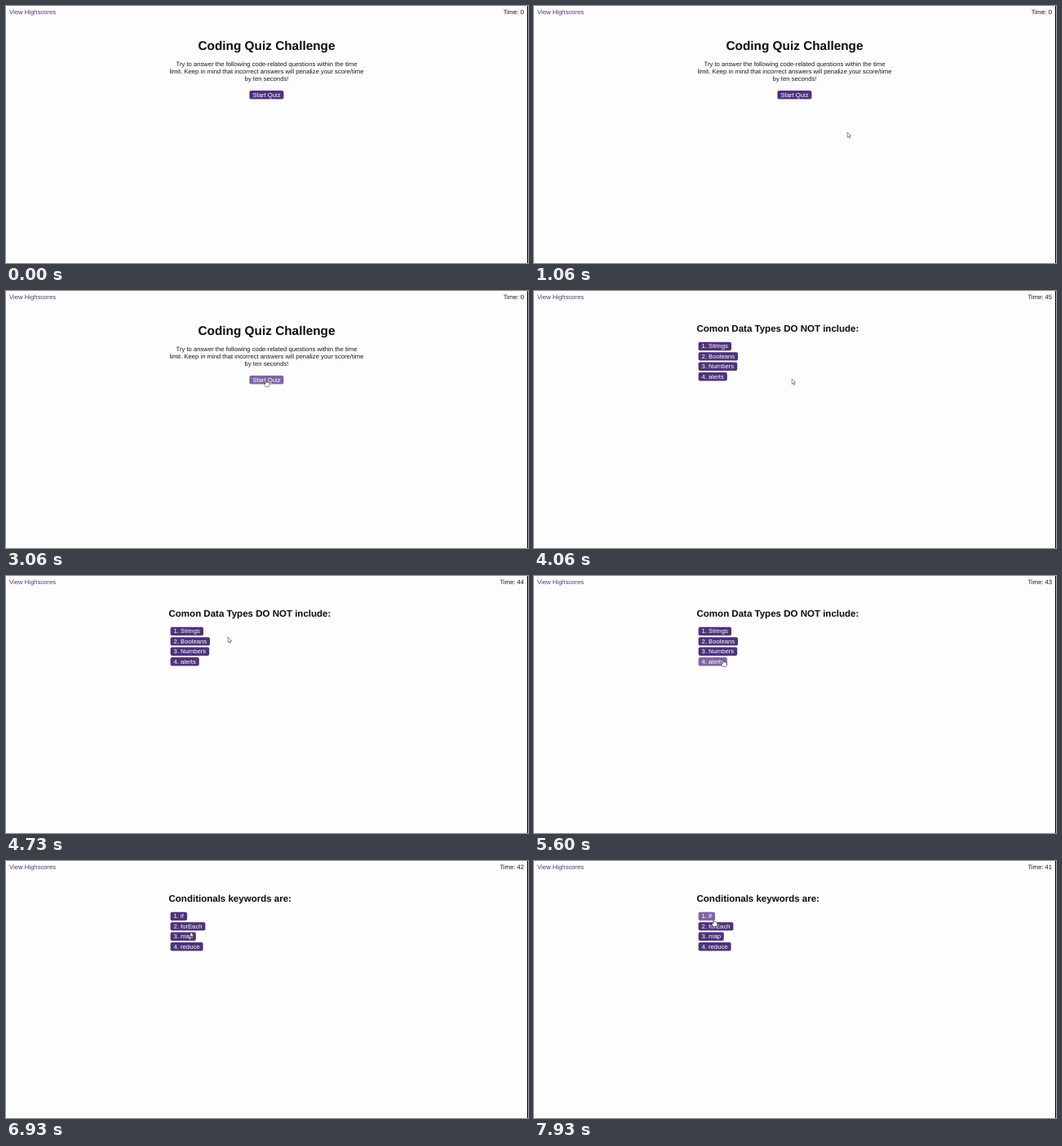
An HTML page that plays this animation: 640 px wide and 316 px high, repeating every 8000 ms.

```html
<!DOCTYPE html>
<html lang="en">
<head>
<meta charset="utf-8">
<title>Coding Quiz</title>
<style>
  html, body { margin: 0; width: 100%; height: 100%; overflow: hidden; background: #fdfdfd; }
  #edge { position: absolute; left: 639px; top: 0; width: 1px; height: 316px; background: #000; }
  #page {
    position: absolute; left: 0; top: 0; width: 1597.5px; height: 790px;
    transform: scale(.4); transform-origin: 0 0;
    font: 19.2px "Liberation Sans", Arial, sans-serif; color: #181818;
    text-rendering: geometricPrecision; white-space: nowrap; cursor: default;
  }
  .scores { position: absolute; top: 10px; left: 10px; color: #4f3b78; }
  .timer { position: absolute; top: 10px; right: 10px; }
  .wrapper { position: absolute; top: 100px; left: 498.75px; width: 600px; }
  .start { text-align: center; }
  h1, h2 { color: #0c0c0c; margin-top: 0; }
  h1 { font-size: 2em; margin-bottom: .67em; }
  h2 { font-size: 1.5em; margin-bottom: .83em; }
  p { margin: 0 0 1em; }
  button {
    display: inline-block; margin: 5px; padding: 2px 10px; border: 0; border-radius: 5px;
    font: inherit; color: #fff; background: #4f337a; pointer-events: none;
  }
  button.hover { background: #8067a5; }
  .question button { display: block; }
  .feedback {
    margin-top: 20px; padding-top: 10px; border-top: 1.5px solid #ccc;
    font-size: 120%; font-style: italic; color: gray;
  }
  [hidden] { display: none; }
  #pointer { position: absolute; left: 0; top: 0; width: 640px; height: 316px; }
  #pointer path { fill: #fff; stroke: #000; stroke-width: 1.1; stroke-linejoin: round; }
</style>
</head>
<body>
<div id="page">
  <div class="scores">View Highscores</div>
  <div class="timer">Time: <span id="time">0</span></div>
  <div class="wrapper">
    <div class="start" id="start">
      <h1>Coding Quiz Challenge</h1>
      <p>Try to answer the following code-related questions within the time<br>limit. Keep in mind that incorrect answers will penalize your score/time<br>by ten seconds!</p>
      <button>Start Quiz</button>
    </div>
    <div class="question" id="types" hidden>
      <h2>Comon Data Types DO NOT include:</h2>
      <button>1. Strings</button>
      <button>2. Booleans</button>
      <button>3. Numbers</button>
      <button>4. alerts</button>
    </div>
    <div class="question" id="keywords" hidden>
      <h2>Conditionals keywords are:</h2>
      <button>1. if</button>
      <button>2. forEach</button>
      <button>3. map</button>
      <button>4. reduce</button>
    </div>
    <div class="feedback" id="feedback" hidden>Correct!</div>
  </div>
</div>
<div id="edge"></div>
<svg id="pointer" viewBox="0 0 640 316">
  <g id="cursor">
    <path id="arrow" d="M.5 .5V16.5L4.2 13L6.6 18.5L9.2 17.4L6.8 12H11.8Z"/>
    <path id="hand" d="M-1.5 12V2Q-1.5 .5 0 .5T1.5 2V7.5Q2 6 3.4 6.2Q5 6.3 5 8Q5.5 7 7 7.2Q8.4 7.5 8.4 9Q9 8.2 10 8.7Q11 9 11 10.5V15Q11 18 9 21.5H-1.5Q-3 18 -5.2 14.5Q-6.5 12.2 -5.5 11.3Q-4.3 10.3 -2.6 12.6Z"/>
  </g>
</svg>
<script>
const FPS = 15, LENGTH = 120;
const SHOW = 10, BEGIN = 49, LEAVE = 61, ANSWER = 87, CLEAR = 102;

// Pointer path: tick, x, y
const path = [
  [10, 465, 153], [11, 465, 153], [16, 384, 155], [19, 384, 155],
  [28, 328, 138], [31, 328, 138], [32, 324.5, 138], [38, 324, 127],
  [44, 321, 113], [46, 318.8, 109.3], [60, 318.8, 109.3], [61, 316, 108],
  [62, 316, 108], [71, 272, 75], [76, 261, 82], [84, 232, 103],
  [98, 232, 103], [104, 225.8, 87], [112, 220, 68], [113, 220, 68],
  [119, 220.3, 72]
];

const el = id => document.getElementById(id);
const buttons = [...document.querySelectorAll("button")];
const show = (id, on) => { el(id).hidden = !on; };
const setVisible = (id, on) => el(id).setAttribute("visibility", on ? "visible" : "hidden");

function pointerAt(tick) {
  const i = path.findIndex(key => key[0] >= tick);
  if (i < 1) return path[0].slice(1);
  const [t0, x0, y0] = path[i - 1], [t1, x1, y1] = path[i];
  const k = (tick - t0) / (t1 - t0);
  return [x0 + (x1 - x0) * k, y0 + (y1 - y0) * k];
}

function contains(node, x, y) {
  const r = node.getBoundingClientRect();
  return x >= r.left && x <= r.right && y >= r.top && y <= r.bottom;
}

function render(tick) {
  show("start", tick < BEGIN);
  show("types", tick >= BEGIN && tick < ANSWER);
  show("keywords", tick >= ANSWER);
  show("feedback", tick >= ANSWER && tick < CLEAR);
  el("time").textContent = tick < BEGIN ? 0 : 45 - Math.floor((tick - BEGIN) / FPS);

  const active = tick >= SHOW;
  const [x, y] = pointerAt(tick);
  let over = false;
  for (const b of buttons) {
    const hit = active && contains(b, x, y);
    b.classList.toggle("hover", hit);
    over = over || hit;
  }
  // The hand stays after the click until the pointer moves again.
  const hand = over || (tick >= BEGIN && tick < LEAVE);
  setVisible("hand", active && hand);
  setVisible("arrow", active && !hand);
  el("cursor").setAttribute("transform", `translate(${x} ${y}) scale(.4)`);
}

let last = -1;
const origin = performance.now();
function loop() {
  const ms = performance.now() - origin;
  const tick = Math.floor((ms + 7) * FPS / 1000) % LENGTH;
  if (tick !== last) render(last = tick);
  requestAnimationFrame(loop);
}
loop();
</script>
</body>
</html>
```
